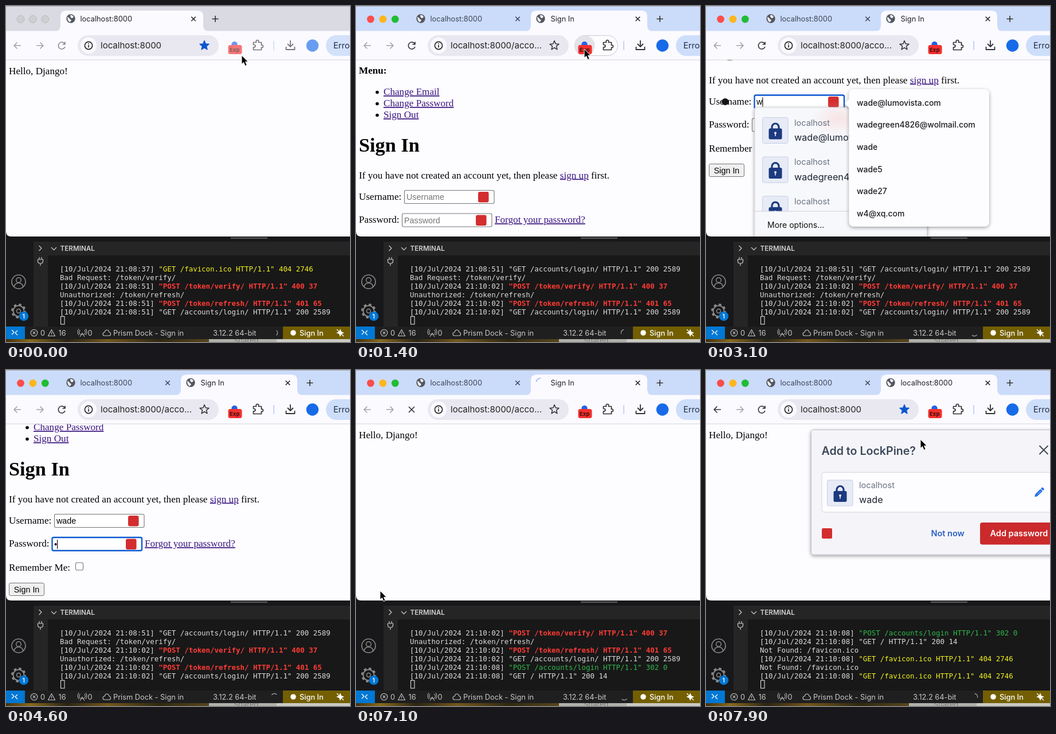
These frames come from a looping animation (600 px wide and 586 px high, 8 s). An HTML page:

```html
<!DOCTYPE html>
<html lang="en">
<head>
<meta charset="utf-8">
<title>Sign in demo</title>
<style>
html, body { margin: 0; width: 100%; height: 100%; overflow: hidden; background: #18181a; }
svg { display: block; width: 600px; height: 586px; font-family: Inter, Roboto, sans-serif; }
text { white-space: pre; }
.page { font: 17.15px "Liberation Serif", Times, serif; }
.h1 { font-size: 34.3px; font-weight: bold; }
.field { font: 14.3px "Liberation Sans", Arial, sans-serif; }
.term { font: 12.45px "DejaVu Sans Mono", Menlo, monospace; }
.b { font-weight: bold; }
.sb { font-weight: 600; }
.md { font-weight: 500; }
.u { text-decoration: underline; }
</style>
</head>
<body>
<svg id="stage" viewBox="0 0 600 586"></svg>
<script>
const LOOP = 8000, STEP = 100;
const INK = '#202124', BLUE = '#0b57d0', RED = '#d32d2f', PAGE = '#fdfcff', LINK = '#3a1580';
const NAME = 'wade', BRAND = 'LockPine';

const text = (x, y, s, size, fill = INK, cls = '') =>
  `<text x="${x}" y="${y}" fill="${fill}" class="${cls}"${size ? ` font-size="${size}"` : ''}>${s}</text>`;
const rect = (x, y, w, h, fill, r = 0, stroke = 'none', sw = 1) =>
  `<rect x="${x}" y="${y}" width="${w}" height="${h}" rx="${r}" fill="${fill}" stroke="${stroke}" stroke-width="${sw}"/>`;
const circle = (x, y, r, fill, stroke = 'none', sw = 1.5) =>
  `<circle cx="${x}" cy="${y}" r="${r}" fill="${fill}" stroke="${stroke}" stroke-width="${sw}"/>`;
const line = (d, stroke = INK, sw = 1.6) =>
  `<path d="${d}" fill="none" stroke="${stroke}" stroke-width="${sw}" stroke-linejoin="round"/>`;
const shape = (d, fill, more = '') => `<path d="${d}" fill="${fill}" ${more}/>`;
const at = (x, y, s, more = '') => `<g transform="translate(${x} ${y}) ${more}">${s}</g>`;
const cross = (x, y, r, color, sw) => line(`M${x - r} ${y - r}l${2 * r} ${2 * r}m0 ${-2 * r}l${-2 * r} ${2 * r}`, color, sw);

// Piecewise linear value through [time, value] pairs.
function key(t, pts) {
  const i = pts.findIndex(p => p[0] > t);
  if (i < 0) return pts[pts.length - 1][1];
  if (!i) return pts[0][1];
  const [a, u] = pts[i - 1], [b, v] = pts[i];
  return u + (v - u) * (t - a) / (b - a);
}
// Last value whose time has come.
const held = (t, pts) => pts.filter(p => p[0] <= t).pop()[1];

const defs = `<defs>
  <clipPath id="view"><path d="M0 94.5H600V402H9Q0 402 0 393z"/></clipPath>
  <filter id="drop" x="-10%" y="-10%" width="120%" height="125%"><feDropShadow dx="0" dy="2" stdDeviation="3" flood-opacity=".38"/></filter>
  <radialGradient id="glow"><stop stop-color="#f8c4c4"/><stop offset="1" stop-color="#f8c4c4" stop-opacity="0"/></radialGradient>
  <linearGradient id="wall"><stop stop-color="#43300f"/><stop offset=".12" stop-color="#8a6a1c"/><stop offset=".3" stop-color="#2b2413"/>
    <stop offset=".5" stop-color="#75571c"/><stop offset=".75" stop-color="#30290f"/><stop offset="1" stop-color="#57451c"/></linearGradient>
</defs>`;

const entry = (time, rest) => `[10/Jul/2024 21:${time}] ${rest}`;
function visit(time) {
  return ['Bad Request: /token/verify/', entry(time, '"POST /token/verify/ HTTP/1.1" 400 37'),
    'Unauthorized: /token/refresh/', entry(time, '"POST /token/refresh/ HTTP/1.1" 401 65'),
    entry(time, '"GET /accounts/login/ HTTP/1.1" 200 2589')];
}
const missing = time => entry(time, '"GET /favicon.ico HTTP/1.1" 404 2746');
const log = [missing('08:37'), ...visit('08:51'), ...visit('10:02'),
  entry('10:08', '"POST /accounts/login HTTP/1.1" 302 0'), entry('10:08', '"GET / HTTP/1.1" 200 14'),
  'Not Found: /favicon.ico', missing('10:08'), 'Not Found: /favicon.ico', missing('10:08')];

function logLine(s, y) {
  const base = '#dcdcdc';
  if (s[0] !== '[') return text(94, y, s, 0, base, 'term');
  const [color, cls] = / 40[01] /.test(s) ? ['#ff3b34', 'b'] : / 404 /.test(s) ? ['#f4f41c', '']
    : / 302 /.test(s) ? ['#2fb84a', ''] : [base, ''];
  return text(94, y, `${s.slice(0, 23)}<tspan fill="${color}" class="${cls}">${s.slice(23)}</tspan>`, 0, base, 'term');
}

function arc(x, y, r, deg, color, sw) {
  return at(x, y, line(`M${r * .64} ${-r * .77}A${r} ${r} 0 0 1 ${r * .64} ${r * .77}`, color, sw), `rotate(${deg})`);
}
const turn = t => key(t % 1000 / 1000, [[0, 0], [.1, 85], [.4, 210], [.5, 238], [.6, 265], [.9, 325], [1, 360]]);

function editor(t) {
  const dim = '#8a8a8a', light = '#c8c8c8';
  let s = rect(0, 395, 600, 191, '#18181a') + rect(48, 411, 552, 148, '#252526') + rect(73, 435, 527, 124, '#181819')
    + rect(392, 403.5, 64, 2.5, '#555');
  s += line('M57.5 418l4.5 4.5-4.5 4.5', light, 1.2) + line('M79 421l4.5 4.5 4.5-4.5', light, 1.2)
    + text(94.5, 427, 'TERMINAL', 11.7, '#cfcfcf', 'sb');
  s += line('M58 438v4m4-4v4m-6.500 0h9v3q0 4-4.500 4t-4.500-4zm4.500 7v4', light, 1.2);
  s += circle(22, 481, 12, 'none', dim, 1.6) + circle(22, 478, 4.3, 'none', dim) + line('M14 490q1.500-7 8-7t8 7', dim);
  s += circle(22, 532, 9.5, 'none', dim, 2) + `<circle cx="22" cy="532" r="11.500" fill="none" stroke="${dim}" stroke-width="3" stroke-dasharray="4.500 4.530"/>`
    + circle(22, 532, 3.5, 'none', dim) + circle(31, 541, 8.3, '#0078d4') + text(28.6, 545, '1', 10.5, '#fff', 'sb');
  const first = held(t, [[0, 0], [800, 3], [900, 5], [6700, 7], [7400, 9], [7500, 11]]);
  log.slice(first, first + 6).forEach((l, i) => s += logLine(l, 462.7 + 15 * i));
  s += rect(95.5, 541.5, 6.5, 13.5, 'none', 0, '#ddd', 1.1);

  s += rect(0, 559, 600, 22, '#1f1f20') + rect(0, 559, 33, 22, '#0078d4') + rect(483, 559, 117, 22, '#735f00');
  s += line('M10 565l4 4-4 4m10-7l-4 4 4 4', '#fff', 1.2);
  s += circle(49, 570, 5.8, 'none', light, 1.1) + cross(49, 570, 2.3, light, 1.1) + text(60, 574.5, '0', 12.8, light)
    + line('M79.500 564.500l6 11h-12zm0 4v3.500m0 1v1', light, 1.1) + text(91.5, 574.5, '16', 12.8, light);
  s += line('M133 570l-4 7m4-7l4 7m-7-4h6M129 565q-3 4 0 8m8-8q3 4 0 8m-10-10q-4 6 0 11m12-11q4 6 0 11', light, 1)
    + text(142.5, 574.5, '0', 12.8, light);
  s += line('M172 575q-3 0-3-3t3-3q1-4 4-4 3 0 4 4 2.500 0 2.500 3t-2.500 3z', light, 1.1)
    + text(187, 574.5, 'Prism Dock - Sign in', 12.8, light) + text(361, 574.5, '3.12.2 64-bit', 12.8, light);
  s += arc(468, 570, 5.7, turn(t), '#aaa', 1.2);
  s += circle(501, 570, 4.8, '#fff') + text(512, 574.5, 'Sign In', 12.8, '#fff', 'md')
    + shape('M583 563l2 5 5 2-5 2-2 5-2-5-5-2 5-2z', '#fff') + line('M577 564l12 12', '#fff', 1.3);
  s += rect(0, 581, 354, 5, 'url(#wall)') + rect(354, 581, 246, 5, '#b1b1ac') + rect(472, 581, 128, 5, '#cbcbc5')
    + `<svg y="581" width="600" height="5">${text(397, 7, 'Shared', 13, '#777')}</svg>`;
  return s;
}

function globe(x) {
  return circle(x, 22, 7.7, '#54575d') + shape(`M${x - 6} 19q3 1 4 3t3 2q-1 4-3 4-4-2-4-9zM${x - 1} 16q4-1 6 3-2 3-4 2t-2-5z`, '#e9edf6');
}
const tabShape = (a, b) => shape(`M${a - 10} 44q10 0 10-10V18q0-10 10-10H${b - 10}q10 0 10 10V34q0 10 10 10z`, '#fbfaff');

function star(x, y, on) {
  const pts = Array.from({ length: 10 }, (_, i) => {
    const a = Math.PI * i / 5, r = i % 2 ? 3.7 : 8.4;
    return `${(x + r * Math.sin(a)).toFixed(1)} ${(y - r * Math.cos(a)).toFixed(1)}`;
  });
  return shape(`M${pts.join('L')}z`, on ? BLUE : 'none', `stroke="${on ? BLUE : '#333'}" stroke-width="1.5" stroke-linejoin="round"`);
}

function arrow(x, dir, color) {
  return line(`M${x - 6 * dir} 69h${12 * dir}m${-5.5 * dir} -5.500l${5.5 * dir} 5.500l${-5.5 * dir} 5.500`, color, 1.6);
}

function chrome(t) {
  const active = t >= 300, second = t >= 700, loading = t >= 6600 && t < 7300, home = !second || t >= 7300;
  const hover = active && t < 1700, tool = active ? '#333' : '#8b8c90';
  let s = shape('M0 0H600V402H9Q0 402 0 393z', PAGE) + rect(0, 0, 600, 44, active ? '#cbdbfa' : '#d9dae2')
    + rect(0, 0, 600, 1, '#a9adb5');
  ['#fb4d4b', '#fdb61c', '#1fbd35'].forEach((c, i) =>
    s += circle(25.5 + 21.4 * i, 23, 6.4, active ? c : '#cfcfd1', active ? 'none' : '#b9b9bb', 1));
  s += second ? tabShape(305, 508) : tabShape(95, 344);
  const ink = second ? '#3c4557' : INK;
  s += globe(113) + text(129.5, 27, 'localhost:8000', 12.8, ink) + cross(second ? 282 : 327, 22.5, 3.8, ink, 1.5);
  if (second) {
    s += loading ? arc(321, 21, 6.5, 230 + (t - 7100) * .36, '#a8c3f7', 2) : globe(322);
    s += text(339.5, 27, home ? 'localhost:8000' : 'Sign In', 12.8) + cross(491.5, 22.5, 3.8, INK, 1.5);
  }
  const px = second ? 530 : 365;
  s += line(`M${px - 5.5} 22.500h11m-5.500-5.500v11`, '#333', 1.6);

  s += rect(0, 43.5, 600, 50.5, '#fbfaff') + rect(0, 93.5, 600, 1, '#d5d5da');
  s += arrow(20, -1, t >= 7300 ? '#333' : '#a2a3a8') + arrow(59, 1, '#a2a3a8');
  s += loading ? cross(97, 69, 5, '#333', 1.6)
    : line('M102.500 66a6 6 0 1 0 .5 5M103 62.500v4.500h-4.500', tool, 1.6);
  s += rect(125, 51, 246, 36, '#e9e8f1', 18) + circle(144, 69, 14, '#fbfaff') + circle(144, 69, 6.6, 'none', '#222', 1.6)
    + rect(143.2, 68, 1.6, 4.5, '#222') + rect(143.2, 65, 1.6, 1.7, '#222');
  s += text(165, 74, home ? 'localhost:8000' : 'localhost:8000/acco...', 15, '#222') + star(346, 69, home);

  if (hover) s += rect(381.5, 51.5, 75, 35, '#fdfcff', 17.5, '#c9c9ce') + circle(399, 69, 17.5, '#e3e3e9');
  let ext = circle(398.5, 67, 5.2, '#2563e8') + rect(387.5, 68, 24, 16, '#f4302f', 3.5) + text(390, 79.5, 'Exp', 9.6, '#3c0d0d', 'b');
  ext += line('M431.500 63.500h5q-1-4 2-4t2 4h5v5q3-1 3 1.800t-3 2v4.200h-14v-4.500q3.500 0 3.500-2.300t-3.500-2.200z', '#333', 1.7);
  ext += rect(466.3, 61, 1.6, 16, '#b7cbf5') + line('M496 60v11m-5-5l5 5 5-5M488.500 71v5h15v-5', '#333', 1.8);
  ext += circle(534.5, 69, 10.7, '#176be8');
  s += `<g opacity="${active ? 1 : .65}">${ext}</g>`;
  s += rect(558, 51, 80, 36, active ? '#cddefb' : '#d3e1fa', 18) + text(571, 74, 'Error', 14.6, '#1f2b45');
  return s;
}

const lock = (x, y) => rect(x, y, 44.5, 45, '#e7ebf6', 3, '#c4cee5')
  + line(`M${x + 16.5} ${y + 22}v-5.500a6 6 0 0 1 12 0v5.500`, '#1c3a80', 3.2) + rect(x + 11, y + 19, 23, 19, '#1c3a80', 2.5)
  + circle(x + 22.5, y + 27, 2, '#e7ebf6') + rect(x + 21.7, y + 27, 1.6, 5.5, '#e7ebf6');
const pencil = (x, y) => at(x, y, rect(-7, -2.6, 13, 5.2, '#1769e8', 1) + shape('M-7-2.600L-11 0l4 2.600z', '#1769e8')
  + rect(7, -2.6, 3.5, 5.2, '#1769e8', 1.2) + line('M-5 .3h9', '#dfe9fc', .8), 'rotate(-45)');

function field(x, y, value, hint, focus, caret) {
  return rect(x + .5, y + .5, 156.5, 23, '#fff', 2.5, focus ? BLUE : '#767676', focus ? 2.3 : 1.1)
    + text(x + 4, y + 17, value || hint, 0, value ? '#000' : '#757575', 'field')
    + (focus ? rect(x + 4 + caret, y + 4.5, 1.1, 16, '#000') : '') + rect(x + 129, y + 3, 18.5, 18.5, RED, 3);
}

const accounts = [`${NAME}@lumovista.com`, 'wadegreen4826+10...', ''];
function vault() {
  let s = `<g filter="url(#drop)">${rect(85, 343, 300.5, 260, '#f7f8fb', 2, '#c9ccd4', .8)}</g>`;
  s += `<ellipse cx="230" cy="362" rx="46" ry="30" fill="url(#glow)" opacity=".4"/>`;
  accounts.forEach((a, i) => {
    const y = 360.5 + 68.6 * i;
    s += lock(98.5, y) + text(154, y + 14, 'localhost', 14.5, '#6a7283') + text(154, y + 40.5, a, 16.2, '#1d2433') + pencil(344, y + 21.5);
  });
  return s + rect(85.5, 524, 299.5, 60, '#f7f8fb') + rect(85, 523.5, 300.5, 1, '#cfd2da') + text(107, 552.5, 'More options...', 14, '#111');
}

const suggestions = [`${NAME}@lumovista.com`, 'wadegreen4826@wolmail.com', NAME, `${NAME}5`, `${NAME}27`, 'w4@xq.com'];
function suggest(typed) {
  let s = `<g filter="url(#drop)">${shape('M252 160l-10 10 10 10z', '#fdfcff')}${rect(249.5, 145, 244.5, 239.5, '#fdfcff', 8)}</g>`;
  suggestions.filter(v => v.startsWith(typed)).forEach((v, i) => s += text(263, 173.8 + 38.6 * i, v, 13.9, '#1c1c20', 'md'));
  return s;
}

function form(t) {
  const scroll = key(t, [[2000, 0], [2400, 142], [2600, 142], [2900, 166], [3600, 166], [4200, 70]]);
  const typed = NAME.slice(0, held(t, [[0, 0], [3000, 1], [3200, 2], [3300, 3], [3500, 4]]));
  const dots = t < 4600 ? 0 : Math.min(9, 1 + Math.floor((t - 4600) / 150));
  const user = t >= 1900 && t < 4300, pass = t >= 4300;
  const p = (x, y, s, fill = '#000', cls = '') => text(x, y, s, 0, fill, 'page ' + cls);
  let s = p(5, 118, 'Menu:', '#000', 'b');
  ['Change Email', 'Change Password', 'Sign Out'].forEach((m, i) =>
    s += circle(37, 150.5 + 20 * i, 2.8, '#000') + p(48, 155 + 20 * i, m, LINK, 'u'));
  s += p(5, 253.5, 'Sign In', '#000', 'h1')
    + p(5, 300.5, `If you have not created an account yet, then please <tspan fill="${LINK}" class="u">sign up</tspan> first.`);
  s += p(5, 338, 'Username:') + field(84, 321, typed, 'Username', user, [0, 10.3, 18.3, 26.2, 34.2][typed.length]);
  s += p(5, 378, 'Password:') + field(80, 361.5, '•'.repeat(dots), 'Password', pass, dots * 5) + p(242, 378, 'Forgot your password?', LINK, 'u');
  s += p(5, 420, 'Remember Me:') + rect(121.5, 406, 13, 13, '#fff', 2.5, '#767676', 1.1);
  s += rect(5.5, 441.5, 61, 22, t >= 6400 ? '#dcdcdc' : '#efefef', 2.5, '#767676') + text(13.8, 457.5, 'Sign In', 0, '#000', 'field');
  const open = t >= 2000 && t < 3600;
  s = at(0, -scroll, s + (open ? vault() : ''));
  if (open && t >= 3000) s += suggest(typed);
  if (t >= 2000 && t < 3200) {
    const y = key(t, [[2700, 333], [3100, 167]]), k = key(t, [[2700, 1], [3100, .34]]);
    const mic = t < 3000 ? rect(-3, -10, 6, 12, '#fff', 3) + line('M-6.500-2q0 7 6.500 7t6.500-7M0 5v4', '#fff', 1.6)
      + shape('M5-12l1.300 3.700L10-7 6.300-5.700 5-2 3.700-5.700 0-7l3.700-1.300z', '#f5a623') : '';
    s += at(33.5, y, rect(-18, -18, 36, 36, '#141417', t < 3000 ? 11 : 18) + mic, `scale(${k})`);
  }
  return s;
}

function savePrompt() {
  return `<g filter="url(#drop)">${rect(183.5, 104.5, 440, 217.5, '#f5f5f9', 4, '#c3c6cc')}</g>`
    + text(201.5, 148, `Add to ${BRAND}?`, 19.6, '#3d4859', 'sb') + cross(589, 139.5, 7.5, '#3d4859', 2)
    + rect(202, 178.5, 420, 69.5, '#fdfcff', 4, '#d3d4dc') + lock(211.5, 192)
    + text(267, 206, 'localhost', 14.5, '#6a7283') + text(267, 232, NAME, 16.2, '#1d2433') + pencil(581, 213.5)
    + rect(202, 276, 18, 18, RED, 2)
    + text(392.5, 290, 'Not now', 14.5, '#2a61c4', 'sb') + rect(478, 266, 140, 38.5, '#cb2a2c', 4)
    + text(495.5, 290, 'Add password', 14.5, '#fff', 'sb');
}

function pointer(t) {
  if (t >= 3000 && t < 5700) return '';
  const x = key(t, [[0, 411], [300, 399], [1500, 398], [1800, 170], [5700, 170], [6300, 42], [7300, 42], [7800, 374]]);
  const y = key(t, [[0, 86], [300, 75], [1500, 75], [1800, 331], [5700, 331], [6300, 385], [7300, 385], [7800, 121]]);
  return t >= 1800 && t < 3000
    ? at(x, y, line('M-3.500-8q3.500 0 3.500 2.500V5.500Q0 8-3.500 8M3.500-8Q0-8 0-5.500V5.500Q0 8 3.500 8M-2 3h4', '#111', 1.2))
    : at(x, y, shape('M0 0V15.500l3.500-3.200 2.700 6.200 3-1.300-2.700-6H11.300z', '#000', 'stroke="#fff" stroke-width="1"'));
}

function scene(t) {
  let body = '';
  if (t < 700 || t >= 6700) body = text(5, 118.5, 'Hello, Django!', 0, '#000', 'page');
  else if (t >= 900) body = form(t);
  if (t >= 7600) body += savePrompt();
  return defs + editor(t) + chrome(t) + `<g clip-path="url(#view)">${body}</g>` + pointer(t);
}

const stage = document.getElementById('stage');
let shown = -1;
function tick(now) {
  const t = Math.floor(now % LOOP / STEP) * STEP;
  if (t !== shown) stage.innerHTML = scene(shown = t);
  requestAnimationFrame(tick);
}
tick(performance.now());
</script>
</body>
</html>
```
